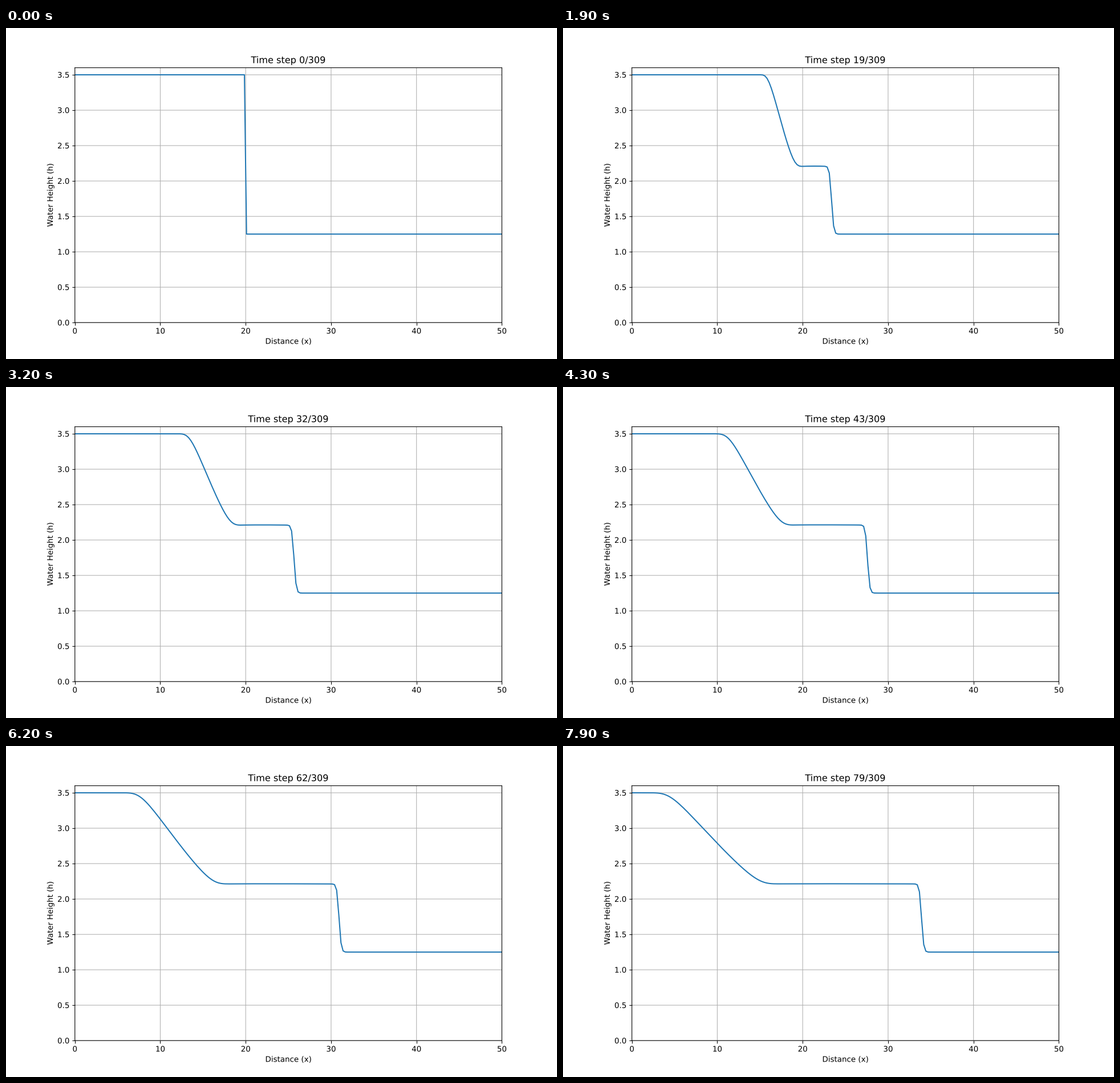
Write a matplotlib script that moves like this. It is 966 by 580 pixels and loops after 8 s.

```python
import numpy as np
import matplotlib.pyplot as plt
from matplotlib.animation import FuncAnimation
from matplotlib.patheffects import Normal

W, H, DPI = 966, 580, 96.6
G, CFL = 9.81, 0.9
LENGTH, CELLS = 50, 200
H_LEFT, H_RIGHT, DAM = 3.5, 1.25, 20
FRAMES, LAST_STEP = 80, 309

x = np.linspace(0, LENGTH, CELLS)
dx = x[1] - x[0]


def flux(h, q):
    return np.array([q, q * q / h + 0.5 * G * h * h])


def roe(left, right):
    """Roe flux across each cell face."""
    (hl, ql), (hr, qr) = left, right
    wl, wr = np.sqrt(hl), np.sqrt(hr)
    u = (ql / wl + qr / wr) / (wl + wr)
    c = np.sqrt(G * (hl + hr) / 2)
    dh, dq = right - left
    slow, fast = u - c, u + c
    back = np.abs(slow) * (fast * dh - dq) / (2 * c)
    ahead = np.abs(fast) * (dq - slow * dh) / (2 * c)
    upwind = np.array([back + ahead, back * slow + ahead * fast])
    return (flux(*left) + flux(*right) - upwind) / 2


def dam_break():
    """Water heights after each time step of the shallow water equations."""
    state = np.array([np.where(x <= DAM, H_LEFT, H_RIGHT), np.zeros(CELLS)])
    heights = [state[0].copy()]
    for _ in range(FRAMES - 1):
        h, q = state
        dt = CFL * dx / np.max(np.abs(q / h) + np.sqrt(G * h))
        padded = np.pad(state, ((0, 0), (1, 1)), mode="edge")
        faces = roe(padded[:, :-1], padded[:, 1:])
        state = state - dt / dx * np.diff(faces, axis=1)
        heights.append(state[0].copy())
    return heights


heights = dam_break()

# Lines and text keep their subpixel positions; text is drawn as outlines.
plt.rcParams.update({
    "font.family": "DejaVu Sans",
    "path.snap": False,
    "path.effects": [Normal()],
    "text.hinting": "no_hinting",
})
# The tiny margin guards against rounding down to one pixel less.
fig, ax = plt.subplots(figsize=((W + 1e-6) / DPI, (H + 1e-6) / DPI), dpi=DPI)
line, = ax.plot(x, heights[0])
ax.set(xlim=(0, LENGTH), ylim=(0, H_LEFT + 0.1),
       xlabel="Distance (x)", ylabel="Water Height (h)")
ax.grid(True)
title = ax.set_title("")


def update(step):
    line.set_ydata(heights[step])
    title.set_text(f"Time step {step}/{LAST_STEP}")
    return line, title


anim = FuncAnimation(fig, update, frames=FRAMES, interval=100,
                     repeat=True, repeat_delay=0)
plt.show()
```
